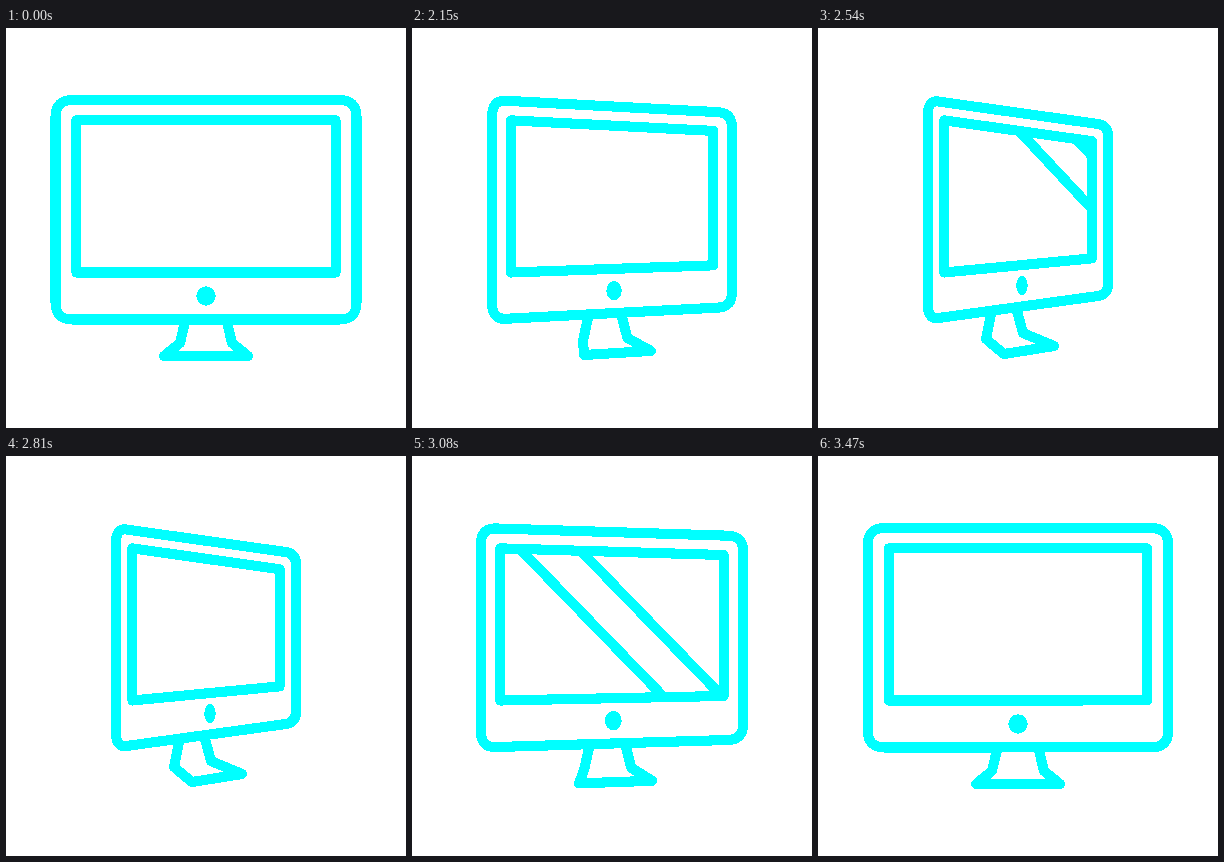
An HTML page that plays this animation: 400 by 400 pixels, repeating every 3650 ms.

```html
<!DOCTYPE html>
<html>
<head>
<meta charset="utf-8">
<style>
html, body { margin: 0; overflow: hidden; background: #fff; }
svg { display: block; shape-rendering: crispEdges; }
path { fill: none; stroke: #0ff; stroke-width: 10.1; stroke-linecap: round; stroke-linejoin: round; }
clipPath path { stroke: none; }
ellipse { fill: #0ff; }
</style>
</head>
<body>
<svg width="400" height="400" viewBox="0 0 400 400">
  <clipPath id="window"><path id="pane"/></clipPath>
  <path id="glare" clip-path="url(#window)"/>
  <path id="screen"/>
  <path id="bezel"/>
  <path id="stand"/>
  <ellipse id="button"/>
</svg>
<script>
const LOOP = 3650, START = 2030, LAST = 3470, STEP = 30;
const $ = id => document.getElementById(id);
const setPath = (id, d) => $(id).setAttribute('d', d);

// Stand outline: x, y facing front, then the shift when turned aside.
const standPoints = [
  [179, 294, -6, -8], [174, 315, -6, -4], [158, 328, 28, -2],
  [242, 328, -6, -10], [226, 315, -21, -10], [221, 294, -22, -11]
];

// cubic-bezier(.3, 0, .05, 1)
function ease(x) {
  if (x <= 0) return 0;
  if (x >= 1) return 1;
  let lo = 0, hi = 1;
  for (let i = 0; i < 30; i++) {
    const s = (lo + hi) / 2, r = 1 - s;
    if (0.9 * s * r * r + 0.15 * s * s * r + s * s * s < x) lo = s;
    else hi = s;
  }
  return lo * lo * (3 - 2 * lo);
}

// Rounded box whose far right side narrows towards its middle as it turns.
function box(half, squeeze, top, bottom, radius, turn) {
  const project = (x, y) => {
    const u = (x + half) / (2 * half);
    return [200 + x * (1 - squeeze * turn), y - 0.23 * turn * u * (y - 183)];
  };
  const corners = [[-half, top], [half, top], [half, bottom], [-half, bottom]];
  const towards = ([x, y], [tx, ty]) =>
    project(x + radius * Math.sign(tx - x), y + radius * Math.sign(ty - y));
  return corners.map((corner, i) => {
    const from = towards(corner, corners[(i + 3) % 4]);
    const to = towards(corner, corners[(i + 1) % 4]);
    return `${i ? 'L' : 'M'}${from} Q${project(...corner)} ${to}`;
  }).join(' ') + 'Z';
}

// Diagonal reflection; c is its x - y offset at mid-screen.
function streak(c, slope) {
  const at = y => [c + 168 + (y - 168) / slope, y];
  return `M${at(50)} L${at(300)}`;
}

function draw(t) {
  const turn = ease((t - 2000) / 580) - ease((t - 2840) / 700);

  const pane = box(129.6, 0.432, 92.35, 244.5, 0, turn);
  setPath('pane', pane);
  setPath('screen', pane);
  setPath('bezel', box(150.5, 0.4, 72, 291.5, 17, turn));
  setPath('stand', 'M' + standPoints.map(([x, y, dx, dy]) => [x + dx * turn, y + dy * turn]).join('L'));

  const first = t < 2740;
  const lead = first ? -54 + 0.94 * (t - 2330) : -23 + 0.79 * (t - 2960);
  const gap = first ? 60 - 0.05 * (t - 2330) : 59;
  const slope = 1.01 + 0.06 * turn;
  setPath('glare', streak(lead, slope) + streak(lead - gap, slope));

  const button = { cx: 200 + 4 * turn, cy: 268 - 10.5 * turn, rx: 9.7 - 4 * turn, ry: 9.7 };
  for (const key in button) $('button').setAttribute(key, button[key]);
}

function tick() {
  const t = performance.now() % LOOP;
  draw(t < START ? 0 : Math.min(LAST, START + STEP * Math.floor((t - START) / STEP)));
  requestAnimationFrame(tick);
}
tick();
</script>
</body>
</html>
```
